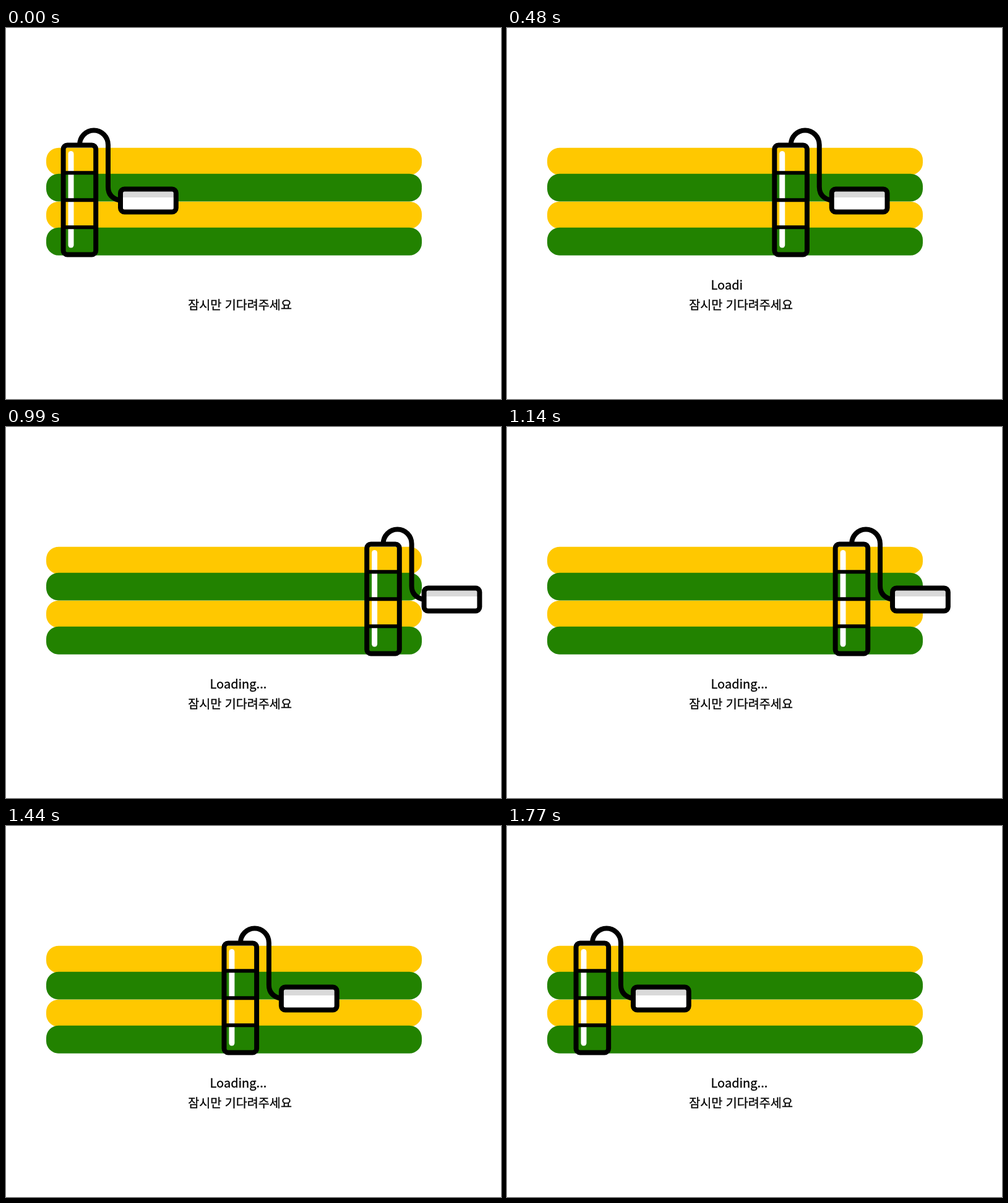
An HTML page without scripts for the animation above (1.8 s loop, 800 by 600 pixels).

```html
<!DOCTYPE html>
<html lang="ko">
<head>
<meta charset="utf-8">
<title>Loading</title>
<style>
  @property --i { syntax: "<number>"; inherits: true; initial-value: 0; }

  html, body { margin: 0; width: 100%; height: 100%; overflow: hidden; background: #fff; }

  svg {
    display: block;
    width: 800px;
    height: 600px;
    animation: tick 1.8s steps(60) -1ms infinite;
  }

  /* --i counts 60 ticks of 30 ms per loop */
  @keyframes tick { from { --i: 0; } to { --i: 60; } }

  /* out and back: brisk start, soft turn on the right, sharp turn on the left */
  .roller {
    --x: min(var(--i) / 30, 2 - var(--i) / 30);
    --bend: (.0925 + var(--x) * (1.498 + var(--x) * (1.076 * var(--x) - 1.668)));
    transform: translateX(calc(501.3px * var(--x) * (1 + (1 - var(--x)) * var(--bend))));
  }

  .yellow { fill: #ffc800; }
  .green { fill: #228200; }
  .line { fill: none; stroke: #000; stroke-width: 8; }

  text {
    font: 500 20px "Noto Sans CJK KR", "Noto Sans CJK", "Noto Sans", sans-serif;
    stroke: #000;
    stroke-width: .3;
  }
  .wait { font-size: 19.6px; }

  /* one letter every three ticks */
  .typed tspan {
    --on: calc(var(--i) - 1 - 3 * var(--n));
    fill-opacity: var(--on);
    stroke-opacity: var(--on);
  }
</style>
</head>
<body>
<svg viewBox="0 0 800 600">
  <g class="yellow">
    <rect x="65" y="193.7" width="607" height="44" rx="20"/>
    <rect x="65" y="280.7" width="607" height="44" rx="20"/>
  </g>
  <g class="green">
    <rect x="65" y="235.7" width="607" height="44.8" rx="20"/>
    <rect x="65" y="322.7" width="607" height="45" rx="20"/>
  </g>

  <g class="roller">
    <path class="line" d="M119 189a23 23.5 0 0 1 46 0V257q0 18 20 22"/>
    <rect x="100.5" y="199" width="9" height="156.5" rx="4.5" fill="#fff"/>
    <path class="line" style="stroke-width:6" d="M92 234.3h54M92 278.3h54M92 322.3h54"/>
    <rect class="line" x="92.6" y="189.4" width="52.6" height="177" rx="6.5"/>
    <rect x="185" y="260.5" width="90" height="37" rx="6.5" fill="#fff"/>
    <path d="M187 263h86v11h-86z" fill="#d9d9d9"/>
    <rect class="line" x="185" y="260.5" width="89.8" height="37" rx="6.5"/>
  </g>

  <text class="typed" x="329.5" y="423"><tspan style="--n:0">L</tspan><tspan style="--n:1">o</tspan><tspan style="--n:2">a</tspan><tspan style="--n:3">d</tspan><tspan style="--n:4">i</tspan><tspan style="--n:5">n</tspan><tspan style="--n:6">g</tspan><tspan style="--n:7">.</tspan><tspan style="--n:8">.</tspan><tspan style="--n:9">.</tspan></text>
  <text class="wait" x="294.2" y="455">잠시만 기다려주세요</text>
</svg>
</body>
</html>
```
